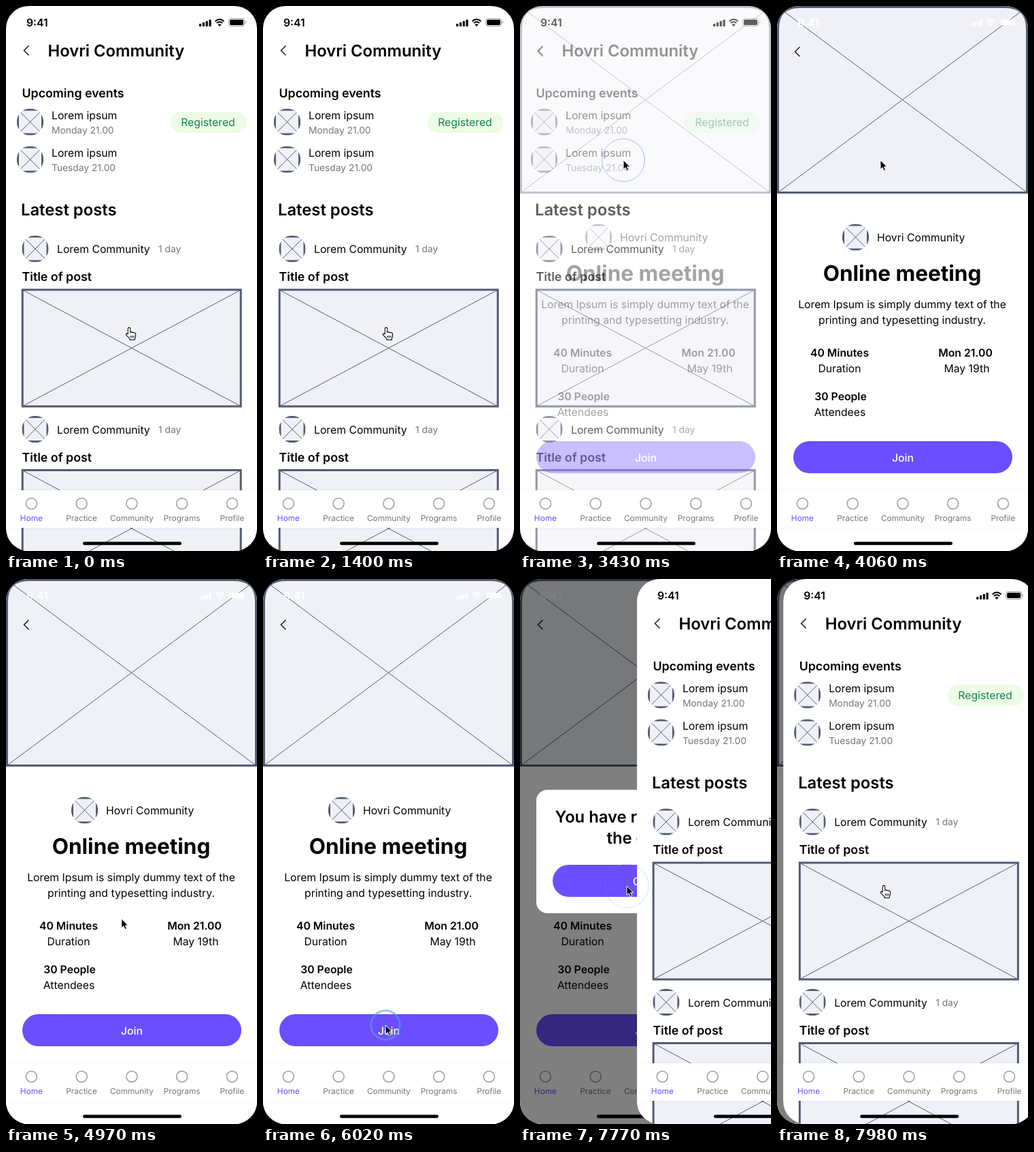
Write an HTML page that moves like this. It is 369 by 799 pixels and loops after 8 s.

```html
<!DOCTYPE html>
<html lang="en">
<head>
<meta charset="utf-8">
<title>Community app prototype</title>
<style>
html, body { margin: 0; width: 100%; height: 100%; overflow: hidden; background: #000; }
svg { display: block; width: 369px; height: 799px; font-family: Inter, Roboto, sans-serif; text-rendering: geometricPrecision; }
.bar { filter: drop-shadow(0 0 2px rgba(0, 0, 0, .05)); }
</style>
</head>
<body>
<svg id="stage" viewBox="0 0 369 799"></svg>
<script>
const PURPLE = '#6b4eff', GRAY = '#72777a', EDGE = '#525c73', PALE = '#f0f1f6';
const S = 15.75, SMALL = 13.8, HEAD = 17.8, BIG = 23.8;
const GROUP = 'Hovri Community';

const text = (x, y, size, str, weight = 400, fill = '#000', anchor = 'start') =>
  `<text x="${x}" y="${y}" font-size="${size}" font-weight="${weight}" fill="${fill}" text-anchor="${anchor}">${str}</text>`;
const mid = (x, y, size, str, weight, fill) => text(x, y, size, str, weight, fill, 'middle');
const box = (x, y, w, h, fill, r = 0) =>
  `<rect x="${x}" y="${y}" width="${w}" height="${h}" rx="${r}" fill="${fill}"/>`;

// Crossed-out picture placeholder
const picture = (x, y, w, h) =>
  `<g stroke="${EDGE}"><rect x="${x + 1.5}" y="${y + 1.5}" width="${w - 3}" height="${h - 3}" fill="${PALE}" stroke-width="3"/>
  <path d="M${x + 2} ${y + 2}l${w - 4} ${h - 4}m0 ${4 - h}l${4 - w} ${h - 4}"/></g>`;
const avatar = (x, y) =>
  `<g transform="translate(${x} ${y})" clip-path="url(#round)">${picture(-19.5, -19.5, 39, 39)}</g>`;
const event = (y, day) => avatar(35.5, y) + text(67, y - 4, S, 'Lorem ipsum') + text(67, y + 17, SMALL, day, 400, GRAY);
const post = y => avatar(43, y) + text(75, y + 6, S, 'Lorem Community') + text(224, y + 5, SMALL, '1 day', 400, GRAY)
  + text(23.5, y + 47, HEAD, 'Title of post', 600) + picture(22.7, y + 58.5, 324, 174);
const button = (x, y, w, label) => box(x, y, w, 47, PURPLE, 23.5) + mid(185, y + 29.5, S, label, 500, '#fff');
const fact = (x, y, head, label, x2 = x) => mid(x, y, S, head, 600) + mid(x2, y + 23.5, S, label);

const chevron = '<path d="M33.5 58.300l-7 7 7 7" fill="none" stroke="#222" stroke-width="1.6"/>';

const status = `<g id="status" fill="currentColor">
  ${text(30, 30, S, '9:41', 600, 'currentColor')}
  ${[0, 1, 2, 3].map(i => box(284 + i * 4.8, 26 - i * 2, 3.2, 4 + i * 2, 'currentColor', .8)).join('')}
  <path d="M307.5 22.5q6.5-6 13 0M309.8 25q4.2-3.6 8.4 0" fill="none" stroke="currentColor" stroke-width="2"/>
  <path d="M311.4 27.3q2.6-2 5.2 0L314 30z"/>
  <rect x="327.5" y="18.5" width="23" height="11" rx="3" fill="none" stroke="currentColor" opacity=".4"/>
  ${box(329, 20, 20, 8, 'currentColor', 1.7)}
  <path d="M351.7 22q2.4 2 0 4z" opacity=".5"/></g>`;

const nav = `<g id="nav"><rect class="bar" y="710" width="369" height="55" fill="#fff"/>
  ${['Home', 'Practice', 'Community', 'Programs', 'Profile'].map((name, i) => {
    const x = 37.4 + i * 73.75;
    return `<circle cx="${x}" cy="729.5" r="8" fill="#fff" stroke="#979c9e" stroke-width="1.5"/>`
      + mid(x, 755, 11.8, name, 400, i ? GRAY : PURPLE);
  }).join('')}
  ${box(113, 785.5, 145, 4.8, '#000', 2.4)}</g>`;

const list = `<g id="list">${box(0, 0, 369, 799, '#fff')}${chevron}
  ${text(61.5, 74, BIG, GROUP, 600)}
  ${text(23.5, 134, HEAD, 'Upcoming events', 600)}
  ${event(170, 'Monday 21.00')}${event(225, 'Tuesday 21.00')}
  ${box(242, 155, 111.5, 31, '#ecfce5', 15.5)}${mid(297, 176, S, 'Registered', 400, '#198155')}
  ${text(22, 307, BIG, 'Latest posts', 600)}
  ${post(356)}${post(620.5)}</g>`;

const detail = `<g id="detail">${box(0, 0, 369, 799, '#fff')}
  <g>${picture(0, 0, 369, 275)}<path d="M1.5 34V33Q1.5 1.5 33 1.5M336 1.5Q367.5 1.5 367.5 33" fill="none" stroke="${EDGE}" stroke-width="3"/></g>
  <g><g transform="translate(0 1.7)">${chevron}</g>${avatar(115.5, 339)}
  ${text(147, 345, S, GROUP)}
  ${mid(184, 403, 31.5, 'Online meeting', 700)}
  ${mid(184, 443, S, 'Lorem Ipsum is simply dummy text of the')}
  ${mid(184, 466, S, 'printing and typesetting industry.')}
  ${fact(92, 513.5, '40 Minutes', 'Duration')}
  ${fact(277, 513.5, 'Mon 21.00', 'May 19th', 279)}
  ${fact(93.5, 577.5, '30 People', 'Attendees', 92.5)}
  ${button(24, 638, 322, 'Join')}</g></g>`;

const modal = `<g id="modal">${box(0, 0, 369, 799, 'rgba(0,0,0,.5)')}
  ${box(24, 309, 322, 181, '#fff', 16)}
  ${mid(185, 357, BIG, 'You have registered for', 600)}${mid(185, 388, BIG, 'the event!', 600)}
  ${button(48, 419, 274, 'Okay')}${box(113, 785.5, 145, 4.8, '#000', 2.4)}</g>`;

const $ = id => document.getElementById(id);
$('stage').innerHTML = `<defs>
  <clipPath id="round"><circle r="19.7"/></clipPath>
  <clipPath id="phone"><rect width="369" height="799" rx="33"/></clipPath></defs>
  <g clip-path="url(#phone)">${list}${detail}${status}${nav}${modal}</g>
  <g id="slide" clip-path="url(#phone)"><use href="#list"/>${status.replace('id="status"', '')}<use href="#nav"/></g>
  <circle id="ripple" fill="none" stroke="#5b9be8"/>
  <g id="cursor"><path id="arrow" d="M0 0V13.5L3.1 10.7 5.2 15.5 7.6 14.5 5.6 9.8H9.6Z" stroke="#fff"/>
  <path id="hand" transform="scale(1.06)" d="M-1.6 9V1a1.6 1.6 0 0 1 3.2 0V6q1.4-1 2.7.3 1.5-.8 2.6.5 2-.3 2.1 1.5V11q0 2-1.2 3.5V16.5H1V15Q-1 13-4 9.8q-1-1.6.4-2.1 1-.2 2 1zM2.3 10.5v3M4.4 10.5v3M6.5 10.5v3" fill="#fff" stroke="#000"/></g>`;

const LOOP = 8000;
const unit = (t, start, span) => Math.min(1, Math.max(0, (t - start) / span));
const easeOut = u => 1 - (1 - u) ** 2;
const smooth = u => u * u * (3 - 2 * u);
const show = (el, alpha) => {
  el.setAttribute('opacity', alpha);
  el.style.display = alpha > 0 ? '' : 'none';
};

// [start, end, x, y, bend of the sideways motion]
const moves = [[1540, 2730, 152, 226, 1], [4060, 5600, 180, 654, 1], [6250, 7130, 157, 450, 3]];
// [time, x, y]
const clicks = [[3010, 152, 226], [5880, 180, 654], [7250, 157, 450]];

function draw(t) {
  const p = easeOut(unit(t, 3350, 400));
  for (const layer of $('detail').children) show(layer, p);
  const tone = Math.round(255 * p);
  $('status').style.color = `rgb(${tone},${tone},${tone})`;
  show($('modal'), easeOut(unit(t, 6220, 400)));

  const s = easeOut(unit(t, 7644, 400));
  const shift = 369 * (1 - s);
  show($('slide'), s > 0 ? 1 : 0);
  $('slide').setAttribute('transform', `translate(${shift} 0)`);

  let x = 181, y = 472;
  for (const [start, end, toX, toY, bend] of moves) {
    const u = smooth(unit(t, start, end - start));
    x += (toX - x) * u ** bend;
    y += (toY - y) * u;
  }
  const left = s ? shift : 0;
  const overPost = (!p || s > 0) && x > 23 + left && x < 347 + left && y > 415 && y < 589;
  $('cursor').setAttribute('transform', `translate(${x} ${y})`);
  show($('hand'), overPost ? 1 : 0);
  show($('arrow'), overPost ? 0 : 1);

  const ripple = $('ripple');
  const click = clicks.find(([at]) => t >= at && t < at + 600);
  show(ripple, 0);
  if (click) {
    const u = (t - click[0]) / 600;
    ripple.setAttribute('cx', click[1]);
    ripple.setAttribute('cy', click[2]);
    ripple.setAttribute('r', 8 + 24 * (1 - (1 - u) ** 3));
    ripple.setAttribute('stroke-width', 1 + 3 * Math.max(0, 1 - u * 1.5));
    show(ripple, Math.min(.6, 2 * (1 - u)));
  }
}

const begin = performance.now();
(function tick() {
  draw((performance.now() - begin) % LOOP);
  requestAnimationFrame(tick);
})();
</script>
</body>
</html>
```
